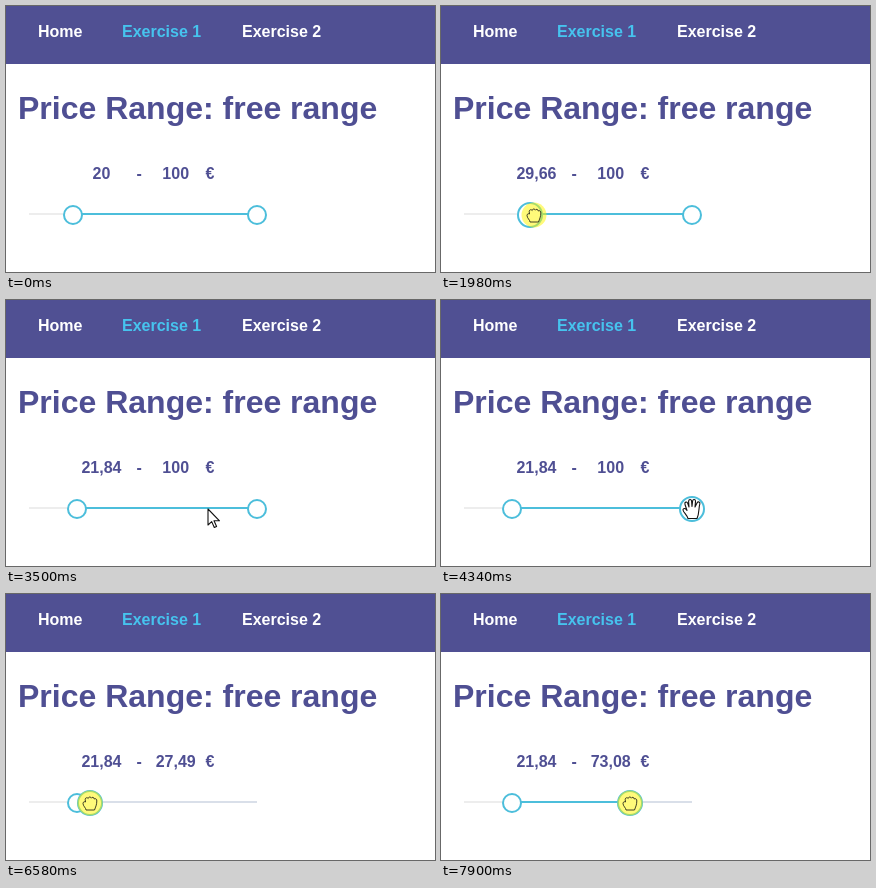
Recreate the animation shown at these times as an HTML page. Size 429 by 266 pixels, loop 8000 ms.

```html
<!DOCTYPE html>
<html lang="en">
<head>
<meta charset="utf-8">
<title>Price range slider</title>
<style>
  html, body { margin: 0; width: 100%; height: 100%; overflow: hidden; background: #fff; }
  svg { display: block; }
  text { font: bold 16px "Liberation Sans", Arial, sans-serif; fill: #4f4f93; }
  .nav text { fill: #fff; }
  .nav .active { fill: #46c3ee; }
  .title { font-size: 32px; }
  .mid { text-anchor: middle; }
  .handle { fill: #fff; stroke: #4cbedb; stroke-width: 2; }
  #cursor { stroke: #111; stroke-linejoin: round; }
  #press { fill: #fff500; opacity: .52; }
</style>
</head>
<body>
<svg width="429" height="266" viewBox="0 0 429 266">
  <g class="nav">
    <rect width="429" height="58" fill="#505093"/>
    <text x="32" y="31">Home</text>
    <text x="116" y="31" class="active">Exercise 1</text>
    <text x="236" y="31">Exercise 2</text>
  </g>
  <text class="title" x="12" y="113">Price Range: free range</text>
  <text id="lowText" class="mid" x="95.5" y="173"></text>
  <text x="130.5" y="173">-</text>
  <text id="highText" class="mid" x="169.7" y="173"></text>
  <text x="199.5" y="173">€</text>

  <rect x="23" y="207" width="60" height="2" fill="#ededed"/>
  <rect x="83" y="207" width="168" height="2" fill="#d9dfe9"/>
  <rect id="span" y="207" height="2" fill="#4cbedb"/>
  <circle id="low" class="handle" cy="209"/>
  <circle id="high" class="handle" cy="209"/>
  <circle id="press" cy="209" r="12.5"/>
  <path id="cursor"/>
</svg>
<script>
const LOOP = 8000, STEP = 70, TRACK_Y = 209;
const ENTER = 660, ARRIVE = 1360;           // pointer comes in, reaches the low handle
const GRAB_LOW = 1620, DROP_LOW = 3010, GRAB_HIGH = 4410;
const LEAD = 25;                            // ms by which the pointer leads its handle

// [time, x] turning points of the pointer
const path = [[ENTER, 239], [ARRIVE, 67], [1770, 67], [1980, 89], [2330, 141], [2740, 94],
  [2950, 71], [DROP_LOW, 71], [3430, 196], [4270, 251], [GRAB_HIGH, 251], [5240, 96],
  [5510, 78], [6510, 76], [6580, 84], [7340, 96], [7900, 189]];

const shapes = {
  arrow: 'M0 0V16L3.7 12.6L6.3 18.5L8.6 17.5L6 11.8H11.5Z',
  open: 'M-4 9.5C-5 6-8.5 3.5-9 1C-9-1-6.5-1-5 1.5L-7-4.5C-7.8-7-5-8-4.2-5.5L-3-2' +
    'L-3.4-7.5C-3.5-10-.6-10.2-.4-7.8L0-2.5L.6-8C1-10.2 3.8-9.8 3.5-7.5L3-2' +
    'L5-6C6-8 8.5-7 7.8-4.8C6.5-1 7.5 4 5 9.5Z',
  fist: 'M-4 7C-4 5-7 3-7 .5C-7-1.5-5-1.5-4.5-1L-4.8-3.5C-4.8-5.5-2.5-5.8-1.8-4.5' +
    'C-1.5-6.5 1-6.5 1.4-4.8C2-6.2 4-6 4.3-4C5.5-4.8 7-4 6.8-2C6.8 2 5.5 4 4.5 7Z'
};

const el = Object.fromEntries([...document.querySelectorAll('[id]')].map(n => [n.id, n]));
const set = (node, attrs) => {
  for (const name in attrs) node.setAttribute(name, attrs[name]);
};
const clamp = (v, min, max) => Math.min(max, Math.max(min, v));
const price = x => String(+(21.84 + (x - 71) * 0.43424).toFixed(2)).replace('.', ',');
const lastPoint = t => Math.max(0, path.findLastIndex(p => p[0] <= t));

function xAt(t) {
  const i = lastPoint(t), [t0, x0] = path[i], [t1, x1] = path[i + 1] || [LOOP, x0];
  return Math.round(x0 + (x1 - x0) * clamp((t - t0) / (t1 - t0), 0, 1));
}

function draw(time) {
  // Motion advances in steps counted from the latest turning point.
  const start = path[lastPoint(time)][0];
  const t = start + Math.floor((time - start) / STEP) * STEP;

  const low = xAt(clamp(t, ARRIVE, DROP_LOW));
  const high = xAt(Math.max(t, GRAB_HIGH));
  const mouseX = xAt(t + LEAD);
  const mouseY = TRACK_Y + 49 * clamp((ARRIVE - t) / (ARRIVE - ENTER), 0, 1);

  const dragLow = t >= GRAB_LOW && t < DROP_LOW, dragHigh = t >= GRAB_HIGH;
  const pressed = dragLow || dragHigh;
  const near = x => Math.hypot(mouseX - x, mouseY - TRACK_Y) < 12;
  const overLow = dragLow || (!dragHigh && near(low));
  const overHigh = dragHigh || (!dragLow && near(high));
  const shape = pressed ? 'fist' : overLow || overHigh ? 'open' : 'arrow';

  el.lowText.textContent = t < GRAB_LOW ? '20' : price(low);
  el.highText.textContent = price(high);
  set(el.span, { x: low, width: Math.max(0, high - low) });
  set(el.low, { cx: low, r: overLow ? 12 : 9 });
  set(el.high, { cx: high, r: overHigh ? 12 : 9 });
  set(el.press, { cx: mouseX, visibility: pressed ? 'visible' : 'hidden' });
  set(el.cursor, {
    d: shapes[shape],
    transform: `translate(${mouseX} ${mouseY})`,
    fill: pressed ? 'none' : '#fff',
    'stroke-width': pressed ? 0.8 : 1.1,
    visibility: time < ENTER ? 'hidden' : 'visible'
  });
}

const origin = performance.now();
function tick() {
  draw((performance.now() - origin) % LOOP);
  requestAnimationFrame(tick);
}
tick();
</script>
</body>
</html>
```
